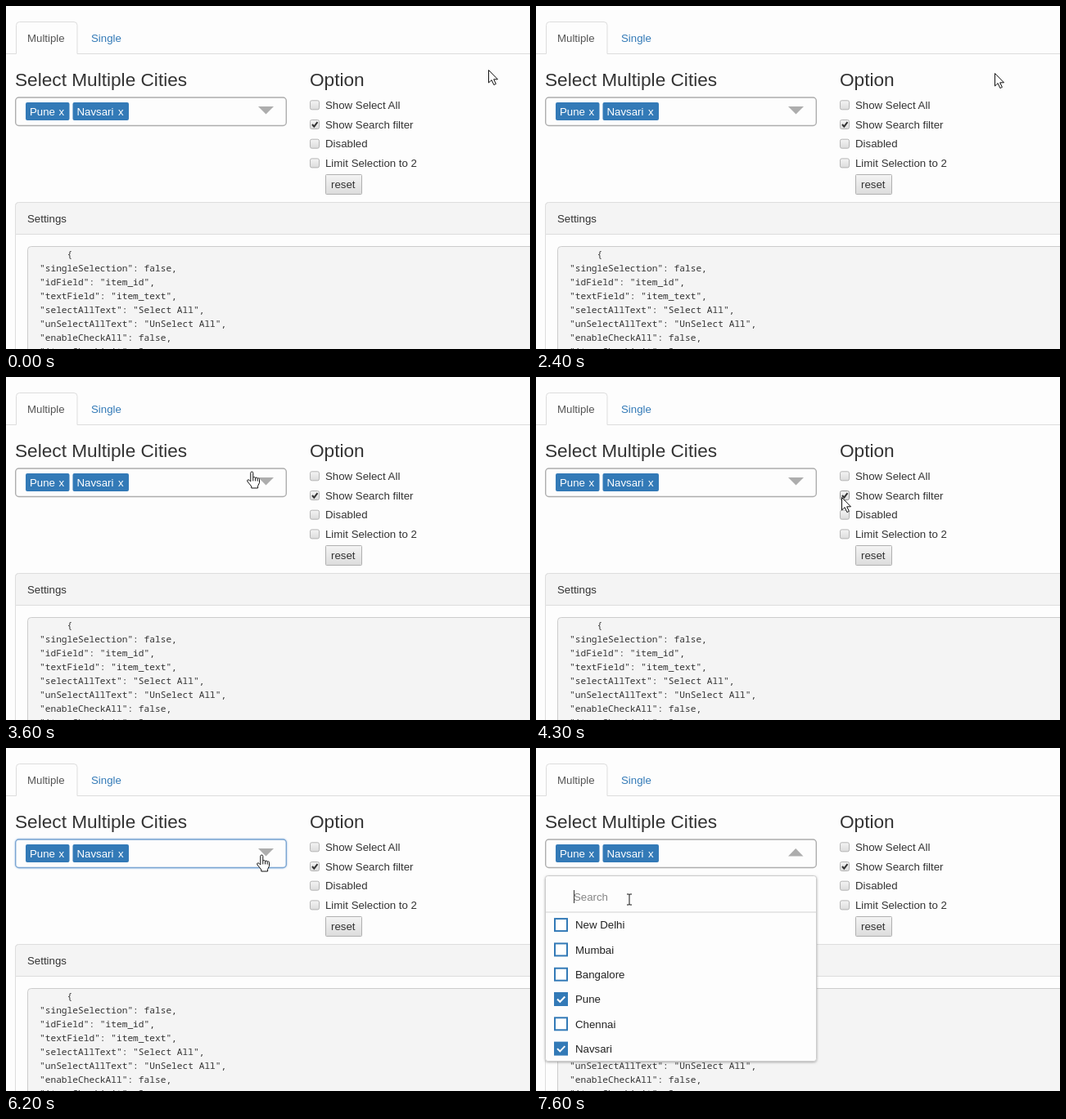
Write an HTML page that moves like this. It is 640 px wide and 420 px high and loops after 8000 ms.

```html
<!DOCTYPE html>
<html lang="en">
<head>
<meta charset="utf-8">
<title>Multi-select dropdown</title>
<style>
  html, body { margin: 0; width: 100%; height: 100%; overflow: hidden; background: #fdfdfd; }
  svg { display: block; }
  text { font: 13.25px "Liberation Sans", Arial, sans-serif; fill: #333; white-space: pre; }
  .title { font-size: 22.65px; }
  .code { font: 11.2px "Noto Sans Mono", monospace; }
  .line { fill: none; stroke: #ddd; }
  .tick { fill: none; stroke-width: 2; }
  .cursor path { fill: #fff; stroke: #111; stroke-linejoin: round; }
  #box { fill: #fdfdfd; stroke: #adadad; stroke-width: 1.4; }
  #box.focused { stroke: #7aa5d2; filter: drop-shadow(0 0 1px #9fc0e6); }
</style>
</head>
<body>
<svg id="stage" width="640" height="420" viewBox="0 0 640 420">
  <defs>
    <linearGradient id="button" x2="0" y2="1">
      <stop stop-color="#f4f4f4"/><stop offset="1" stop-color="#dcdcdc"/>
    </linearGradient>
    <filter id="shadow" x="-5%" y="-5%" width="110%" height="112%">
      <feDropShadow dx="0" dy="1" stdDeviation="1.8" flood-color="#777" flood-opacity=".6"/>
    </filter>
  </defs>
</svg>
<script>
const LOOP = 8000, STEP = 100;
const FOCUS = 6200, OPEN = 6300, SEARCH = 7500;
const stage = document.getElementById('stage');

const text = (x, y, s, attrs = '') => `<text x="${x}" y="${y}" ${attrs}>${s}</text>`;
const rect = (x, y, w, h, attrs) => `<rect x="${x}" y="${y}" width="${w}" height="${h}" ${attrs}/>`;
const path = (d, attrs = '') => `<path d="${d}" ${attrs}/>`;

const chip = (x, w, label) =>
  rect(x, 118, w, 22, 'rx="2" fill="#337ab7"') +
  text(x + 5, 133.5, label, 'style="fill:#fff"') +
  text(x + w - 13, 133.5, 'x', 'style="fill:#fff"');

const option = (label, i) => {
  const y = 121.3 + i * 23.7, checked = i === 1;
  return rect(371.5, y - 5.5, 11, 11, `rx="2" fill="url(#button)" stroke="#b4b4b4" ${checked ? 'id="filter"' : ''}`) +
    (checked ? path(`M374 ${y}l2.3 2.6 4.2-5.4`, 'class="tick" stroke="#333"') : '') +
    text(390, y + 4.7, label);
};

const city = (label, i) => {
  const y = 216.6 + i * 30.3, checked = i === 3 || i === 5;
  return rect(23, y - 7.5, 15, 15, `fill="${checked ? '#337ab7' : '#fff'}" stroke="#337ab7" stroke-width="2"`) +
    (checked ? path(`M26 ${y}l3.3 3.3 6-6.3`, 'class="tick" stroke="#fff"') : '') +
    text(48, y + 4.7, label, 'style="fill:#222"');
};

const settings = [
  '     {',
  '"singleSelection": false,',
  '"idField": "item_id",',
  '"textField": "item_text",',
  '"selectAllText": "Select All",',
  '"unSelectAllText": "UnSelect All",',
  '"enableCheckAll": false,',
  '"itemsShowLimit": 3,'
];

stage.innerHTML += [
  path('M0 58.5H12.5V23.5q0-4 4-4H83q4 0 4 4V58.5H640', 'class="line"'),
  text(26, 43.5, 'Multiple', 'style="fill:#555"'),
  text(104, 43.5, 'Single', 'style="fill:#337ab7"'),
  text(11, 97.5, 'Select Multiple Cities', 'class="title"'),
  text(371, 97.5, 'Option', 'class="title"'),
  ['Show Select All', 'Show Search filter', 'Disabled', 'Limit Selection to 2'].map(option).join(''),
  rect(390.5, 206.5, 44, 24, 'rx="1" fill="url(#button)" stroke="#b0b0b0"'),
  text(397, 223, 'reset'),

  rect(11.5, 240.5, 660, 220, 'rx="4" class="line"'),
  path('M11.5 279.5V244.5q0-4 4-4H641V279.5z', 'fill="#f4f4f4" stroke="#ddd"'),
  text(26, 265, 'Settings'),
  rect(26.5, 294.5, 640, 160, 'rx="4" fill="#f4f4f4" stroke="#ccc"'),
  settings.map((s, i) => text(41, 308 + i * 17, s, 'class="code"')).join(''),

  rect(11.7, 112, 330.6, 34.5, 'id="box" rx="4"'),
  chip(24, 53.5, 'Pune'),
  chip(81.5, 68.5, 'Navsari'),
  path('', 'id="arrow" fill="#adadad"'),

  '<g id="list">',
  rect(11.5, 156.5, 331, 227, 'rx="3" fill="#fdfdfd" stroke="#ccc" filter="url(#shadow)"'),
  text(46, 186.5, 'Search', 'style="fill:#858585"'),
  path('M12 201H342', 'stroke="#d0d0d0"'),
  ['New Delhi', 'Mumbai', 'Bangalore', 'Pune', 'Chennai', 'Navsari'].map(city).join(''),
  path('M46.5 174V190', 'id="caret" stroke="#333"'),
  '</g>',

  '<g id="cursor" class="cursor">',
  path('M.5 .5V16l3.6-3.4 2.8 6 2.5-1.2-2.7-5.6h4.8z', 'id="pointer"'),
  path('M-1.2 12V1.5a1.5 1.5 0 0 1 3 0V7.4c.3-1.3 2.8-1.2 2.8.4c.3-1.2 2.6-1 2.6.6c.4-1.1 2.3-.7 2.3.9V13.5L7.6 17.5V20H-.2V18L-5 12c-1-1.8.8-3 2.2-1.6zM1.8 7.4v4M4.6 8v3.4M7.2 8.6v3', 'id="hand"'),
  path('M-3-6.5h2.2q.8 0 .8.8q0-.8.8-.8H3M0-5.7V5.7M-3 6.5h2.2q.8 0 .8-.8q0 .8.8.8H3', 'id="beam" style="fill:none"'),
  '</g>'
].join('');

// Pointer route: time, x, y of the hot spot
const route = [
  [0, 589, 78], [2300, 589, 78], [2400, 560, 82], [2700, 240, 138], [2800, 174, 144],
  [3000, 228, 125.5], [3200, 238, 124], [3600, 300, 116], [4100, 398, 178],
  [4200, 369, 159], [4300, 373, 147], [4400, 373, 147], [4500, 369, 147],
  [4600, 382, 148], [4700, 378, 148], [5700, 378, 148],
  [6000, 325, 136], [6200, 312, 131], [6600, 308, 131], [7000, 308, 131],
  [7200, 160, 188], [7300, 117, 186], [7400, 117, 186], [7500, 114, 185.5], [LOOP, 114, 185.5]
];

function pointerAt(t) {
  const i = route.findIndex(key => key[0] > t);
  const [t0, x0, y0] = route[i - 1], [t1, x1, y1] = route[i];
  const k = (t - t0) / (t1 - t0);
  return [Math.round(x0 + (x1 - x0) * k), y0 + (y1 - y0) * k];
}

const el = id => document.getElementById(id);
const show = (id, on) => el(id).setAttribute('visibility', on ? 'inherit' : 'hidden');

function draw() {
  const t = Math.floor(performance.now() % LOOP / STEP) * STEP;
  const [x, y] = pointerAt(t);
  const open = t >= OPEN;
  const inside = x > 11 && x < 343;
  const hand = inside && y > 111 && y < 147;
  const beam = inside && open && y > 157 && y < 201;

  el('cursor').setAttribute('transform', `translate(${x} ${y})`);
  show('hand', hand);
  show('beam', beam);
  show('pointer', !hand && !beam);

  el('box').classList.toggle('focused', t >= FOCUS && t < SEARCH);
  el('arrow').setAttribute('d', open ? 'M308 132.5h18.5L317.2 123z' : 'M308 123h19L317.5 132.5z');
  el('filter').setAttribute('stroke', t >= 4300 && t < 4900 ? '#949494' : '#b4b4b4');
  show('list', open);
  show('caret', t >= SEARCH);
  requestAnimationFrame(draw);
}
draw();
</script>
</body>
</html>
```
